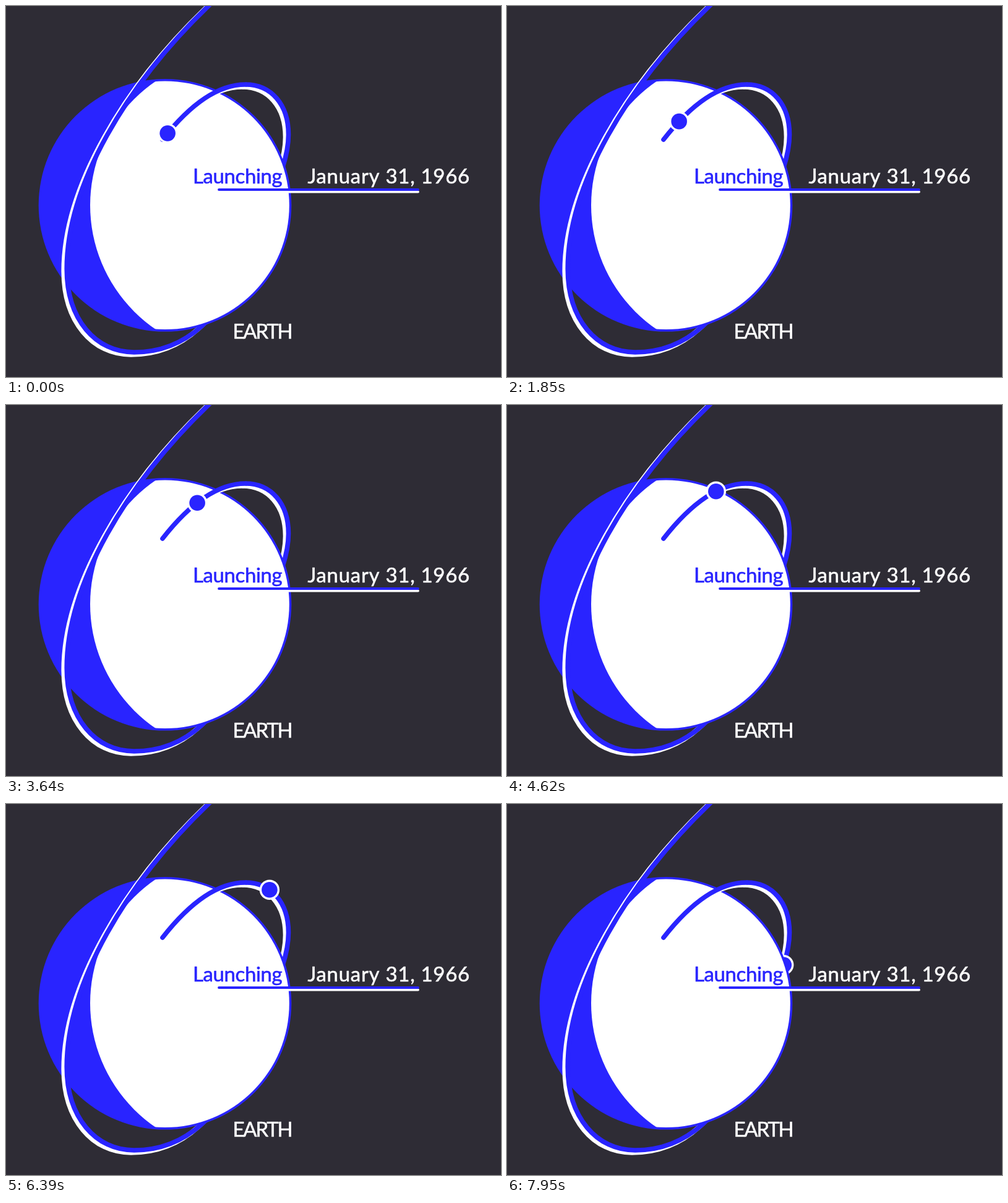
Write an HTML page with a canvas that moves like this. It is 800 px wide and 600 px high and loops after 8 s.

```html
<!DOCTYPE html>
<html lang="en">
<head>
<meta charset="utf-8">
<title>Earth orbit</title>
<style>
  html, body { margin: 0; width: 100%; height: 100%; overflow: hidden; background: #2e2c35; }
  canvas { display: block; }
</style>
</head>
<body>
<canvas id="stage" width="800" height="600"></canvas>
<script>
const ctx = document.getElementById('stage').getContext('2d');
const BG = '#2e2c35', BLUE = '#2924ff', WHITE = '#ffffff';
const LOOP = 8000;
const FONT = '33px Lato, "Open Sans", sans-serif';

// Orbit pieces as cubic curves: x0, y0, then two controls and an end point
const rise = [253, 216, 289, 170, 336, 127, 387, 127];
const bend = [387, 127, 428.7, 127, 456.5, 159.4, 456.5, 208];
const fall = [456.5, 208, 456.5, 227, 452.5, 244, 447, 261];
const sweep = [327, 0, 196, 126, 98.2, 289, 98.2, 425];
const belly = [98.2, 425, 98.2, 507, 145, 560, 207, 560];
const tail = [207, 560, 247, 560, 285, 546, 316, 518];

function route(curves, start, end) {
  const path = new Path2D();
  if (start) {
    path.moveTo(...start);
    path.lineTo(curves[0][0], curves[0][1]);
  } else {
    path.moveTo(curves[0][0], curves[0][1]);
  }
  for (const c of curves) path.bezierCurveTo(...c.slice(2));
  if (end) path.lineTo(...end);
  return path;
}

const loopFront = route([rise]);
const loopBack = route([bend, fall], null, [440, 282]);
const wideFront = route([sweep, belly], [341.5, -14]);
const wideBack = route([tail], null, [335, 500]);

// Walk along the small loop, measured by length
function cubic(c, t) {
  const u = 1 - t;
  const at = i => u * u * u * c[i] + 3 * u * u * t * c[i + 2] + 3 * u * t * t * c[i + 4] + t * t * t * c[i + 6];
  return [at(0), at(1)];
}

const track = [{ s: 0, x: rise[0], y: rise[1] }];
for (const c of [rise, bend, fall]) {
  for (let i = 1; i <= 100; i++) {
    const [x, y] = cubic(c, i / 100);
    const last = track[track.length - 1];
    track.push({ s: last.s + Math.hypot(x - last.x, y - last.y), x, y });
  }
}

function pointAt(s) {
  let i = 1;
  while (i < track.length - 1 && track[i].s < s) i++;
  const a = track[i - 1], b = track[i];
  const k = (s - a.s) / (b.s - a.s);
  return [a.x + (b.x - a.x) * k, a.y + (b.y - a.y) * k];
}

function disc(x, y, r, color) {
  ctx.fillStyle = color;
  ctx.beginPath();
  ctx.arc(x, y, r, 0, Math.PI * 2);
  ctx.fill();
}

function orbit(path, cap = 'butt') {
  ctx.lineWidth = 7.6;
  ctx.lineCap = cap;
  ctx.save();
  ctx.translate(-5, 4);
  ctx.strokeStyle = WHITE;
  ctx.stroke(path);
  ctx.restore();
  ctx.strokeStyle = BLUE;
  ctx.stroke(path);
}

function planet() {
  const x = 257, y = 322.3;
  disc(x, y, 204.3, BLUE);
  ctx.save();
  ctx.beginPath();
  ctx.arc(x, y, 200.8, 0, Math.PI * 2);
  ctx.clip();
  disc(379, y, 243, WHITE);
  ctx.restore();
}

function probe(x, y) {
  disc(x, y, 16.2, WHITE);
  disc(x, y, 12.8, BLUE);
}

function rule(x1, x2, y, color) {
  ctx.strokeStyle = color;
  ctx.lineWidth = 3.8;
  ctx.lineCap = 'round';
  ctx.beginPath();
  ctx.moveTo(x1, y);
  ctx.lineTo(x2, y);
  ctx.stroke();
}

function label(text, x, y, color, spacing) {
  ctx.font = FONT;
  ctx.letterSpacing = spacing + 'px';
  ctx.fillStyle = ctx.strokeStyle = color;
  ctx.lineWidth = 0.6;
  ctx.lineJoin = 'round';
  ctx.fillText(text, x, y);
  ctx.strokeText(text, x, y);
}

function draw(ms) {
  const s = 13 + 36.15 * (Math.exp(0.29 * ms / 1000) - 1);
  const spot = pointAt(s);
  const behind = s > 280;

  ctx.fillStyle = BG;
  ctx.fillRect(0, 0, 800, 600);
  orbit(loopBack);
  orbit(wideBack);
  if (behind) probe(...spot);
  planet();
  orbit(wideFront);
  orbit(loopFront, 'round');
  if (!behind) probe(...spot);

  rule(345, 666, 300.6, WHITE);
  rule(344, 666, 297, BLUE);
  label('Launching', 302, 286.5, BLUE, -0.4);
  label('January 31, 1966', 487.5, 286.5, WHITE, 0.7);
  label('EARTH', 366.5, 538, WHITE, -2.2);
}

const began = performance.now();
function tick() {
  draw((performance.now() - began) % LOOP);
  requestAnimationFrame(tick);
}
tick();
</script>
</body>
</html>
```
